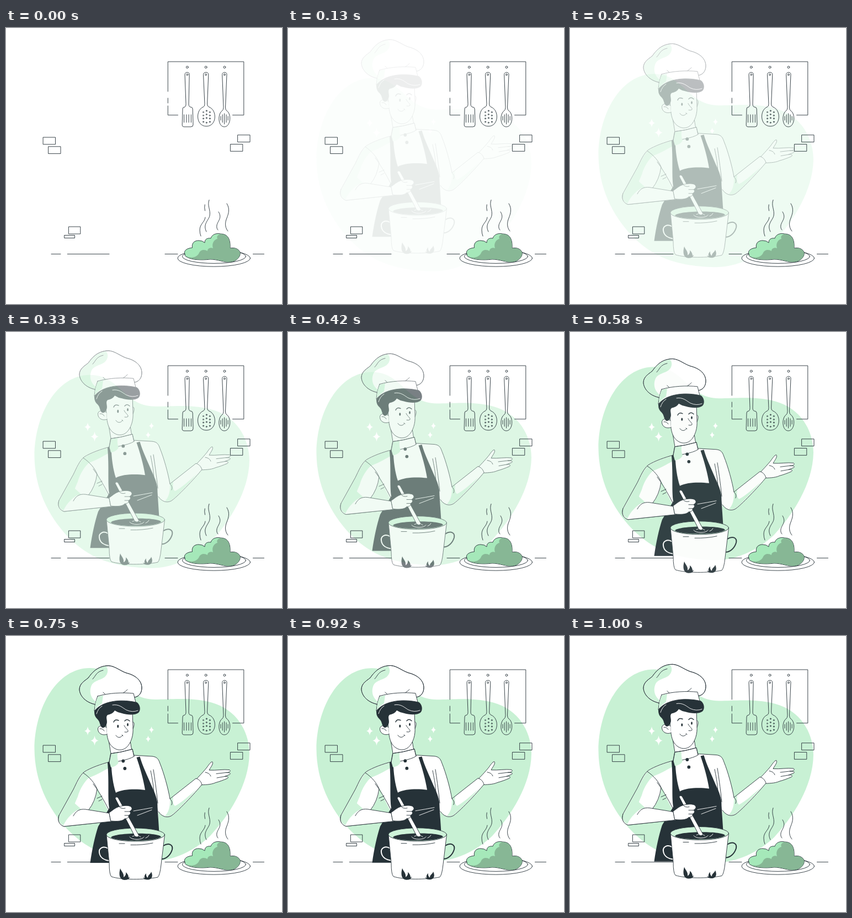
Write an HTML page that moves like this. It is 500 px wide and 500 px high and loops after 1.04 s.

```html
<!DOCTYPE html>
<html lang="en">
<head>
<meta charset="utf-8">
<title>Chef</title>
<style>
html, body { margin: 0; width: 100%; height: 100%; overflow: hidden; background: #fff; }
svg { display: block; width: 100vw; height: 100vh; }
.line, .paper { stroke: #263238; stroke-width: .9; stroke-linecap: round; stroke-linejoin: round; }
.line { fill: none; }
.paper { fill: #fff; }
.ink { fill: #263238; }
.mint { fill: #c8f1d4; }
.shade { fill: #cef3d9; }
.chalk { fill: none; stroke: #fff; stroke-width: .9; stroke-linecap: round; }
.white { fill: #fff; }
</style>
</head>
<body>
<svg viewBox="0 0 500 500">
  <g id="blob" opacity="0">
    <path class="mint" d="M51.500 205C52 130 92 58 152 58C207 58 213 115 270 115C300 115 345 110 380 123C424 139 441 180 441 213C440 270 404 325 370 362C340 390 303 408 262 408C182 406 146 384 113 352C75 312 52 262 51.500 205Z"/>
  </g>
  <g id="stars" class="white"></g>

  <g id="wall">
    <path class="line" d="M293.300 115V61H430.800V157.800H410.500M293.300 127V136M293.300 141V157.800H311.500"/>
    <path class="line" d="M324 84C324 79 332.200 79 332.200 84L331 138Q331 143 335 143.300Q338 143.500 338.200 147L339 175Q339 179 335 179H323Q319 179 319.200 175L320 147Q320 143.500 323 143.300Q326 143 326 138Z"/>
    <path class="line" d="M322.500 157V171M326.800 157V171M331.100 157V171M335.400 157V171"/>
    <path class="line" d="M357.500 84C357.500 79 366.800 79 366.800 84L364.600 138Q364.600 142 368 143.200C383 149 382 178 363 178C344 178 343 149 357 143.200Q360.200 142 360 138Z"/>
    <path class="line" d="M391.700 84C391.700 79 400 79 400 84L397.500 144Q397.500 148.500 400 150C409 156 407 179 395.500 179C384 179 383 156 391.500 150Q394 148.500 394 144Z"/>
    <path class="line" d="M389 160V167M392.200 157V171M395.600 155V174M399 157V171M402.200 160V167"/>
    <path class="line" d="M82 409.500H99M111.300 409.500H187M288 409.500H311M447.500 409.500H467.500"/>
  </g>

  <g id="dish">
    <ellipse class="paper" cx="376.800" cy="417" rx="65.800" ry="15.200"/>
    <ellipse class="line" cx="377" cy="413.800" rx="57.500" ry="12.600"/>
    <path class="line" style="fill:#a5e8b9" d="M324 410C321 403 328 399 337.500 398C336 389 342 385 349 385Q356 385 360 389C360 383 364 380 371 381C373 374 381 371 389 373C402 373 407 383 406 399C414 397 421 400 424 406C426 414 417 423 407 424C394 425 384 419 370 419C353 421 336 420 328 415Q323 413 324 410Z"/>
    <path fill="#87b795" d="M388 373.400C402 373.400 406.600 383 405.600 399.500C414 397.500 421 400.500 423.600 406C425.600 414 417 422.600 407 423.600C394 424.600 384 418.600 370 418.600C353 420.600 336 419.600 328 414.600C340 418 348 413 350 407C353 401 360 401 365 404C365 399 371 397 375 399C372 389 378 383 383 382Q380 376 388 373.400Z"/>
    <path class="line" d="M368 311.500C364 322 371 329 369 340C367 349 356 355 363 369M360.200 320Q359 325 360.500 331M361 343C360 352 351 355 351 366Q351 372 353 377M385 333C392 344 384 349 382 357Q381 363 384 366M400 318C407 329 402 339 399 347C396 356 398 363 402 368"/>
  </g>

  <g id="chef" opacity="0">
    <!-- right hand -->
    <path class="paper" d="M344 260C352 252 360 243 364 238C368 232 372 227 374 228C376 232 371 237 368 243C380 244 394 241 405 242.500C409 246 402 247.500 398 247.500C404 247.500 409 248.500 405 251L396 254.500C402 253.500 404 256 401 258C394 261 386 264 380 265.500C370 270 360 269 352 270Z"/>
    <path class="line" d="M398 247.500L381 249.500M396 254.500L382 257M361 247Q369 248 371 254"/>
    <!-- coat, open between arm and body -->
    <path class="white" fill-rule="evenodd" d="M188 228C172 232 153 239 142 246C133 253 128 266 122 278L96 325C93 334 96 341 105 345L190 336L184 360H276L276 318C282 327 291 330 299 326C308 321 343 284 355 269C353 263 349 259 344 258L297 295C294 277 286 248 279 231C276 222 273 219 265 218L231 216ZM166 276Q163 300 149 316L188 322Q176 300 166 276Z"/>
    <path class="shade" d="M187 229C171 233 153 240 142 247C134 254 128 268 122 279L97 325C95 332 97 338 103 341C112 328 120 324 126 314C121 308 126 301 130 291C134 276 143 263 150 257C166 251 182 241 188 238Z"/>
    <path class="shade" d="M297 295L303 291Q301 304 306 308C318 302 333 288 346 277C334 291 310 318 299 325Q293 328 288 326Q298 316 297 295Z"/>
    <path class="line" d="M188 228C172 232 153 239 142 246C133 253 128 266 122 278L96 325C93 334 96 341 105 345L190 336M276 318C282 327 291 330 299 326C308 321 343 284 355 269C353 263 349 259 344 258L297 295C294 277 286 248 279 231C276 222 273 219 265 218L231 216M262 244C264 254 267 268 268 284M267 242C269 255 272 275 275 303M297 295Q303 300 300 306"/>
    <path class="line" d="M140 248C152 256 161 267 165 277Q162 300 149 316M158 268Q170 283 188 318M165 294L174 290M168 299L174 296"/>
    <!-- apron -->
    <path class="ink" d="M184 229L190.500 226.500C191 249 194 269 199 284C212 277 235 277 252 279C249 260 243 239 236.500 220L242.500 218.500C247 235 257 255 264 272C270 285 275 296 274.500 310L278 364L188 411H152.500C156 386 161 363 167 345L187 312C184 290 187 268 184 229Z"/>
    <path class="chalk" d="M231 317Q249 314 265 311M238 325Q251 320 264 315"/>
    <!-- left forearm -->
    <path class="white" d="M122 326C127 316 134 313 144 314L187 321L191 336L105 345Q95 342 95 332L122 300Z"/>
    <path class="shade" d="M121 300L96 326C94 335 98 341 104 343C111 329 120 321 128 316L136 313.500Z"/>
    <path class="line" d="M122 326C127 316 134 313 144 314L187 321L190 336L105 345C96 342 93 334 96 325"/>
    <!-- neck and collar -->
    <path class="paper" d="M185 184Q188 200 190 213L228 208L225 190Z"/>
    <path class="paper" d="M190 213Q208 211 229 205L232 218Q225 223 204 227L187 229Z"/>
    <path class="shade" d="M190.500 213.500L202 212Q201 222 204 229Q201 236 190 238L187.500 229Z"/>
    <path class="line" d="M187 229Q189 219 190 213Q208 211 229 205L232 218"/>
    <circle class="ink" cx="212.300" cy="226.500" r="2.900"/>
    <circle class="ink" cx="215.300" cy="240" r="2.900"/>
    <!-- head -->
    <path class="paper" d="M228 156C233 154 233 161 230 168L227 173Z"/>
    <path class="paper" d="M180 142L182 170C183 185 186 195 193 201C201 208 211 208 218 202C227 194 231 179 230 166L229 134H188Z"/>
    <path class="paper" d="M182 166C176 160 166 162 166.500 169C167 177 175 181 183 178"/>
    <path class="line" d="M170 168Q175 167 178 172"/>
    <path class="ink" d="M160 138C160 127 168 120 178 118C198 114 222 116 237 120C243 124 245 134 240 139C234 144 219 143 210 140Q203 139 197 135C194 140 189 142 184 143C179 147 186 155 181 162Q179 167 174 166C169 161 171 156 166 151Q160 146 160 138Z"/>
    <path class="chalk" d="M164 141Q167 131 174 127M193 125C205 123 211 130 218 134Q229 139 239 135"/>
    <path class="line" style="stroke-width:1.400" d="M195 156Q197 150 204 153M215 154Q219 149 224 154"/>
    <ellipse class="ink" cx="202.800" cy="163.500" rx="1.500" ry="2.800"/>
    <ellipse class="ink" cx="220.500" cy="160.500" rx="1.400" ry="2.700"/>
    <path class="line" d="M214 162C216 167 222 170 221 173Q219 175 215 174M199 180C202 185 208 185 211 180M210 179L212 181"/>
    <!-- hat -->
    <path class="paper" d="M162 124C146 121 134 110 133 97C133 86 143 81 149 76C156 66 165 56 181 54C195 52 204 62 218 67C235 71 246 81 246 94C246 104 240 110 233 111L161 125Z"/>
    <path class="shade" d="M162 123C146 120 134.500 110 133.600 97C134 87 143 81 149.500 76C156 66 165 57 181 54.600C186 60 185 68 180 73C173 81 158 79 154 92C150 104 156 116 166 121Z"/>
    <path class="line" d="M162 124C146 121 134 110 133 97C133 86 143 81 149 76C156 66 165 56 181 54C195 52 204 62 218 67C235 71 246 81 246 94C246 104 240 110 233 111M157 78C163 72 163 65 176 62M184 110Q180 106 176 102M211 104Q218 100 220 97"/>
    <path class="paper" d="M166 109C187 103 211 102 231 104L235 120C213 115 177 115 160 136Q161 121 166 109Z"/>
    <path class="shade" d="M166.300 110L176 107.500L174 122Q166 127 160.700 134Q161 121 166.300 110Z"/>
    <!-- pot -->
    <path class="chalk" style="stroke-width:2" d="M185 385C176 379 168 385 169 392C170 402 179 406 187 407"/>
    <path class="line" style="stroke-width:2" d="M285 380C295 374 303 378 301 387C298 397 290 404 282 404"/>
    <path class="paper" d="M182 360L187 412Q187 432 191 436C209 442 251 442 275 437Q279 433 281 414L287.500 360Z"/>
    <ellipse cx="234.700" cy="360" rx="52.800" ry="12" class="shade"/>
    <path class="ink" d="M190 365C194 356 278 355 281 364C271 372.500 202 373.500 190 365Z"/>
    <ellipse class="line" cx="234.700" cy="360" rx="52.800" ry="12"/>
    <path class="line" d="M205 376H215M226 378.500Q248 379 266 375"/>
    <path class="ink" d="M207 421C210 428 214 430 213 437Q218 434 217 428Q222 432 222 438L224 436Q224 442 214 442C205 441 204 431 207 421Z"/>
    <path class="ink" d="M263 427C262 432 257 432 257 438Q253 435 254 430Q250 433 251 439L248 437Q250 442 258 441.500C266 440 266 433 263 427Z"/>
    <path class="chalk" d="M224 364C227 370 247 370 250 364M229 363Q238 359 244 364M253 366Q258 364 259 361"/>
    <!-- ladle and fist -->
    <path class="paper" d="M198 294Q199 290 203 293L241 362Q237 366 233 362Z"/>
    <path class="paper" d="M187 320C193 316 198 311 205 309C212 307 224 306 227 310C230 314 226 316 224 318C227 320 225 324 222 325C223 329 219 331 215 331C211 336 200 336 190 335Z"/>
    <path class="line" d="M224 318Q219 318 215 318M222 325L215 325M205 309Q209 314 216 312"/>
  </g>
</svg>
<script>
const LOOP = 1040, STEP = 1000 / 24;
const get = id => document.getElementById(id);
const add = (parent, tag, attrs) => {
  const node = document.createElementNS("http://www.w3.org/2000/svg", tag);
  for (const key in attrs) node.setAttribute(key, attrs[key]);
  parent.append(node);
};

// four-pointed sparkles: centre and radii
[[148, 172, 6, 8], [160.500, 189.500, 7, 9], [263.500, 170, 4.500, 6], [257.500, 186.500, 4.500, 6]].forEach(([x, y, w, h]) =>
  add(get("stars"), "path", { d: `M${x} ${y - h}Q${x + 1} ${y - 1} ${x + w} ${y}Q${x + 1} ${y + 1} ${x} ${y + h}Q${x - 1} ${y + 1} ${x - w} ${y}Q${x - 1} ${y - 1} ${x} ${y - h}Z` }));

// bricks
[[67.500, 198, 22, 12.800], [77, 214.800, 22, 12.800], [420, 193.800, 22, 12.800], [406.800, 210.500, 22, 12.800], [113.800, 360, 21, 13], [106, 375.500, 18.500, 5]].forEach(
  ([x, y, width, height]) => add(get("wall"), "rect", { x, y, width, height, class: "line" }));

// hanging holes and skimmer holes
const hole = (cx, cy, r) => add(get("wall"), "circle", { cx, cy, r, class: "line" });
[328.300, 362.100, 395.900].forEach(x => { hole(x, 71, 1.900); hole(x, 84.500, 1.500); });
[[357.500, [152.500, 158.500, 164, 170]], [363.300, [150, 156.500, 163, 171.500]], [369.300, [152.500, 158.500, 164, 170]]].forEach(
  ([x, rows]) => rows.forEach(y => hole(x, y, 1)));

function draw(now) {
  const t = Math.floor((now % LOOP + 4) / STEP) * STEP;
  const alpha = Math.min(1, Math.max(0, (t - 2 * STEP) / (13 * STEP)));
  // slow swing with its turning point near 825 ms
  const swing = 21 * (1 - Math.cos((t - 825) * Math.PI / 1000)) - .58;
  [["chef", -swing], ["blob", swing]].forEach(([id, y]) => {
    get(id).setAttribute("transform", `translate(0 ${y.toFixed(2)})`);
    get(id).setAttribute("opacity", alpha.toFixed(3));
  });
}

const start = performance.now();
function tick() {
  draw(performance.now() - start);
  requestAnimationFrame(tick);
}
tick();
</script>
</body>
</html>
```
